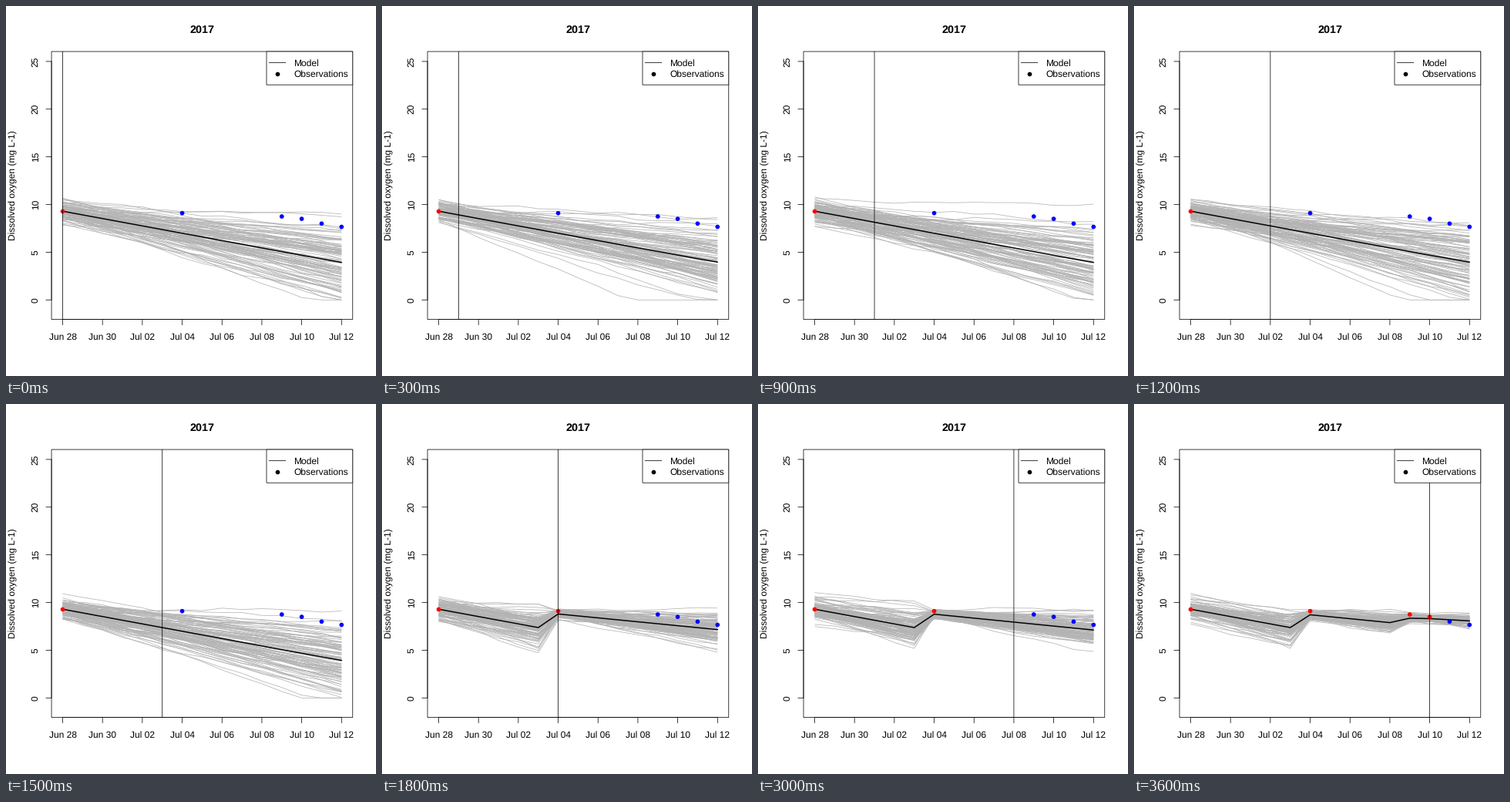
A matplotlib script that plays this animation: 480x480 px, repeating every 3900 ms.

```python
import numpy as np
import matplotlib.pyplot as plt
from matplotlib.animation import FuncAnimation
from matplotlib.collections import LineCollection
from matplotlib.patches import Rectangle

plt.rcParams.update({"font.family": "Liberation Sans", "text.hinting": "none",
                     "lines.solid_capstyle": "round"})

SIZE, DPI = 480, 100
PT = 72 / DPI                      # points per pixel
LINE = 14.4                        # one margin line in pixels
THIN = 0.75
LEFT, RIGHT = 4.1 * LINE, SIZE - 2.1 * LINE
TOP, BOTTOM = 4.1 * LINE, SIZE - 5.1 * LINE
FRAMES, INTERVAL = 13, 300
MEMBERS, DAYS = 100, np.arange(15)

# observed day -> dissolved oxygen
OBS = {0: 9.28, 6: 9.1, 11: 8.75, 12: 8.5, 13: 8.0, 14: 7.66}
OBS_VAR = 0.21


def px(day):
    """Days 0 to 14 fill the plot with a 4 % margin."""
    return LEFT + (RIGHT - LEFT) * (day / 14 + 0.04) / 1.08


def py(value):
    """Values -1 to 25 fill the plot with a 4 % margin."""
    return BOTTOM - (BOTTOM - TOP) * ((value + 1) / 26 + 0.04) / 1.08


def ensemble(k):
    """Ensemble Kalman filter that knows the observations up to day k."""
    rng = np.random.default_rng(40 + k)

    def draw(mean, sd):
        z = rng.normal(size=MEMBERS)
        return mean + sd * (z - z.mean())

    level, loss = draw(9.3, 0.6), draw(0.385, 0.135)
    runs = [level]
    for day in DAYS[1:]:
        level = level - loss + draw(0, 0.12)
        if day in OBS and day <= k:
            cov = np.cov(level, loss)
            gain = cov[0] / (cov[0, 0] + OBS_VAR)
            gap = OBS[day] + draw(0, 0.2) - level
            level, loss = level + gain[0] * gap, loss + gain[1] * gap
        runs.append(level)
    return np.maximum(runs, 0).T


fig = plt.figure(figsize=(SIZE / DPI, SIZE / DPI), dpi=DPI, facecolor="white")
ax = fig.add_axes([0, 0, 1, 1])
ax.set(xlim=(0, SIZE), ylim=(SIZE, 0))
ax.axis("off")


def line(xs, ys, width=THIN, z=5):
    return ax.plot(xs, ys, color="black", lw=width * PT, zorder=z, snap=False)[0]


def box(x0, y0, x1, y1, fill, z):
    ax.add_patch(Rectangle((x0, y0), x1 - x0, y1 - y0, facecolor=fill,
                           edgecolor="black", lw=THIN * PT, zorder=z, snap=False))


def points(xs, ys, z):
    return ax.scatter(xs, ys, s=(5.7 * PT) ** 2, c="black", lw=0, zorder=z,
                      snap=False)


def text(x, y, s, size=12, **kw):
    kw = {"ha": "center", "va": "baseline", "zorder": 9, **kw}
    ax.text(x, y, s, fontsize=size * PT, rotation_mode="anchor", **kw)


# Frame, axes and titles
box(LEFT, TOP, RIGHT, BOTTOM, "none", 5)
line([px(0), px(14)], [BOTTOM] * 2)
line([LEFT] * 2, [py(0), py(25)])
for day in range(0, 15, 2):
    line([px(day)] * 2, [BOTTOM, BOTTOM + LINE / 2])
    name = f"Jun {28 + day}" if day < 3 else f"Jul {day - 2:02d}"
    text(px(day), BOTTOM + 1.8 * LINE, name)
for v in range(0, 26, 5):
    line([LEFT - LINE / 2, LEFT], [py(v)] * 2)
    text(LEFT - 1.2 * LINE, py(v), str(v), rotation=90)
text(LEFT - 3.2 * LINE, (TOP + BOTTOM) / 2, "Dissolved oxygen (mg L-1)", rotation=90)
text((LEFT + RIGHT) / 2, 35, "2017", LINE, weight="bold")

# Legend
box(338, TOP, RIGHT, TOP + 3 * LINE, "white", 7)
line([341.2, 362.8], [TOP + LINE] * 2, z=8)
points([352], [TOP + 2 * LINE], 8)
text(373.4, TOP + LINE + 4.4, "Model", ha="left")
text(373.4, TOP + 2 * LINE + 4.4, "Observations", ha="left")

members = LineCollection([], colors="#b3b3b3", linewidths=THIN * PT, zorder=1)
ax.add_collection(members, autolim=False)
mean_line = line([], [], 2 * THIN, z=2)
dots = points([px(d) for d in OBS], [py(v) for v in OBS.values()], 3)
now = line([], [], z=4)


def update(k):
    runs = ensemble(k)
    members.set_segments([np.column_stack([px(DAYS), py(run)]) for run in runs])
    mean_line.set_data(px(DAYS), py(runs.mean(axis=0)))
    dots.set_facecolors(["red" if d <= k else "blue" for d in OBS])
    now.set_data([px(k)] * 2, [TOP, BOTTOM])
    return members, mean_line, dots, now


anim = FuncAnimation(fig, update, frames=FRAMES, interval=INTERVAL,
                     repeat=True, repeat_delay=0)
plt.show()
```
